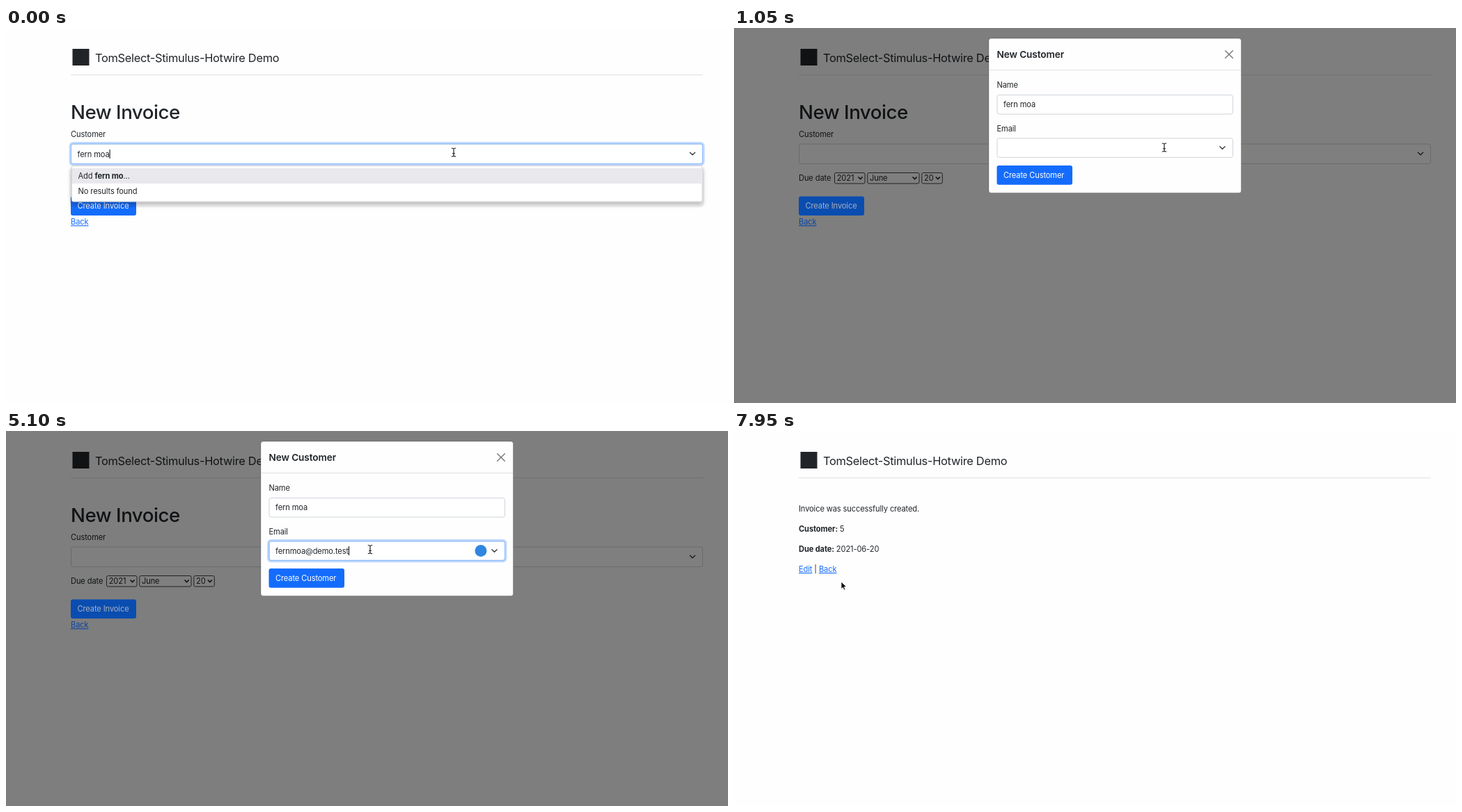
Animation, 1037 px wide and 540 px high, one loop 8 s. Source, as an HTML page:

```html
<!DOCTYPE html>
<html lang="en">
<head>
<meta charset="utf-8">
<title>New Invoice</title>
<style>
html, body { margin: 0; width: 100%; height: 100%; overflow: hidden; background: #fefefe; }
svg { display: block; width: 100vw; height: 100vh; }
text {
  font: 11.1px Inter, "Open Sans", sans-serif;
  font-optical-sizing: none;
  letter-spacing: -.01em;
  fill: #212529;
}
.brand { font-size: 16.4px; letter-spacing: -.018em; }
.h1 { font-size: 27.7px; font-weight: 500; letter-spacing: -.018em; }
.h5 { font-size: 13.7px; font-weight: 600; }
.b { font-weight: 700; }
.link { fill: #146cfd; text-decoration: underline; }
.white { fill: #fff; }
.mail { font-size: 9.2px; font-weight: 600; letter-spacing: 0; fill: #fff; }
.line { fill: none; stroke: #343a40; stroke-width: 1.4; stroke-linecap: round; stroke-linejoin: round; }
</style>
</head>
<body>
<svg id="stage" viewBox="0 0 1037 540" preserveAspectRatio="none"></svg>
<script>
const LOOP = 8000, STEP = 150;
const BLUE = '#146cfd';
const NAME = 'fern moa', MAIL = 'fernmoa@demo.test';

const saved = ['fenolunarasodeph@demo.test', 'sdfs', 'domanmabuz19@demo.test',
  'dolver@demo.test', 'sdf', 'tovman@demo.test'];

// [time, letters typed]
const keys = [[2700, 2], [2850, 4], [3150, 5], [3300, 6], [3450, 7], [3750, 8], [4050, 9],
  [4200, 10], [4350, 11], [4500, 12], [4800, 13], [4950, 15], [5100, 17]];

// [time, x, y, pointer]
const moves = [[0, 643, 179, 'beam'], [450, 643, 178, 'arrow'], [1050, 618, 172, 'beam'],
  [1200, 566, 157, 'arrow'], [1350, 524, 150, 'arrow'], [1500, 523, 156, 'arrow'],
  [1650, 523, 170.5, 'beam'], [5400, 523, 170.5, 'beam'], [5850, 522.5, 170, 'arrow'],
  [6000, 523, 170.5, 'beam'], [6600, 440, 186, 'beam'], [6750, 300, 226, 'arrow'],
  [6900, 200, 246, 'arrow'], [7050, 147, 257, 'hand'], [7950, 154, 217, 'arrow']];

const text = (x, y, s, cls = '', id = '') => `<text x="${x}" y="${y}" class="${cls}" id="${id}">${s}</text>`;
const rect = (x, y, w, h, more = '') => `<rect x="${x}" y="${y}" width="${w}" height="${h}" ${more}/>`;
const field = (x, y, w, h) => rect(x, y, w, h, 'rx="2.9" fill="#fff" stroke="#ced4da"');
const ring = (x, y, w, h, id) => `<g id="${id}" fill="none">` +
  rect(x - 1.5, y - 1.5, w + 3, h + 3, 'rx="4.4" stroke="#0d6efd" stroke-opacity=".25" stroke-width="3"') +
  rect(x, y, w, h, 'rx="2.9" stroke="#86b7fe"') + '</g>';
const chevron = (x, y) => `<path class="line" d="M${x - 3.6} ${y - 1.8}l3.6 3.6 3.6-3.6"/>`;
const select = (x, w, s) => rect(x, 208.5, w, 15.5, 'rx="2" fill="#fff" stroke="#444"') +
  text(x + 3.2, 220.3, s) +
  `<path class="line" d="M${x + w - 9} 214.8l2.6 2.8 2.6-2.8" style="stroke-width:1.7"/>`;

const form = text(93, 131, 'New Invoice', 'h1') + text(93, 156.5, 'Customer') +
  field(93.5, 167, 907, 28.5) + ring(93.5, 167, 907, 28.5, 'pageRing') +
  text(102.5, 185.5, '', '', 'customer') + rect(0, 175, 1, 13, 'id="pageCaret"') + chevron(986, 181) +
  text(93, 220.3, 'Due date') + select(144.5, 43.5, '2021') + select(191.8, 74.2, 'June') +
  select(269.8, 29.5, '20');

const receipt = text(93, 116, 'Invoice was successfully created.') +
  text(93, 145, '<tspan class="b">Customer:</tspan> 5') +
  text(93, 174, '<tspan class="b">Due date:</tspan> 2021-06-20') +
  text(93, 203, '<tspan class="link">Edit</tspan> | <tspan class="link">Back</tspan>');

const options = rect(91, 200, 912, 58, 'rx="6" fill-opacity=".05"') +
  rect(94.5, 198.5, 905.5, 51.5, 'rx="2.5" fill="#fff" stroke="#d4d4d4" filter="url(#shade)"') +
  rect(95, 202, 904.5, 22, 'fill="#e9e9ed"') +
  text(103.5, 217.4, 'Add <tspan class="b" id="query"></tspan>...') + text(103.5, 239.4, 'No results found');

const popup = rect(378, 188, 165.5, 167.5, 'rx="3" fill="#2a2a2e" stroke="#555" stroke-width=".5" filter="url(#shade)"') +
  saved.map((s, i) => text(386.5, 209.6 + i * 26.2, s, 'mail')).join('');

const modal = rect(366, 15, 362.5, 222.5, 'rx="3.5" fill="#fefefe" stroke="#000" stroke-opacity=".2"') +
  text(377.5, 42.8, 'New Customer', 'h5') +
  '<path d="M705.7 32.7l10.6 10.6m0-10.6l-10.6 10.6" stroke="#7a7a7a" stroke-width="1.5" stroke-linecap="round"/>' +
  rect(366.5, 60, 361.5, 1, 'fill="#dee2e6"') +
  text(377.5, 86, 'Name') + field(378, 96.5, 338.5, 27.5) + text(387, 114.4, NAME) +
  text(377.5, 148.5, 'Email') + field(378, 158.8, 338.5, 27.5) + ring(378, 158.8, 338.5, 27.5, 'mailRing') +
  text(387, 176.7, '', '', 'mail') + rect(0, 166, 1, 13, 'id="mailCaret"') +
  `<circle id="badge" cx="682" cy="172.5" r="8.5" fill="#2f86e0"/>` + chevron(701.5, 172.5) +
  '<g id="submit">' + ring(377.5, 198, 108.5, 27.7, 'submitRing') +
  rect(377.5, 198, 108.5, 27.7, `rx="2.9" fill="${BLUE}"`) + text(387, 216.2, 'Create Customer', 'white') + '</g>' +
  `<g id="popup">${popup}</g>`;

const pointers = `
<g id="beam" fill="none" stroke-linecap="round">
  ${['#fff" stroke-width="2.4', '#111" stroke-width="1.1'].map(s =>
    `<path stroke="${s}" d="M-2.8-6q2.4 0 2.8 1.2q.4-1.2 2.8-1.2M0-4.8V4.8M-2.8 6q2.4 0 2.8-1.2q.4 1.2 2.8 1.2M-1.5 1.8h3"/>`).join('')}
</g>
<path id="arrow" d="M0 0V10.4l2.4-2.1 1.7 3.7 1.7-.8-1.6-3.6h3.3z" fill="#000" stroke="#fff" stroke-width=".8"/>
<path id="hand" d="M-2 0q1-1.2 2 0v4.2q1.2-.9 2 .2q1.1-.7 1.9.3q1.5-.4 1.7 1V8.500q-.2 1.800-1.200 3.300H-2.300Q-3-.500-5 6.300q.600-1.600 3 .200z" fill="#fff" stroke="#111" stroke-width=".9" stroke-linejoin="round"/>`;

stage.innerHTML = `
<filter id="shade" x="-10%" y="-20%" width="120%" height="150%">
  <feDropShadow dx="0" dy="3.500" stdDeviation="3" flood-opacity=".25"/>
</filter>
${rect(0, 0, 1037, 540, 'fill="#fefefe"')}
${rect(95.5, 30, 24, 24, 'fill="#212529"')}
${text(128, 48.6, 'TomSelect-Stimulus-Hotwire Demo', 'brand')}
${rect(93, 67, 908, 1, 'fill="#dee2e6"')}
<g id="form">${form}</g>
<g id="receipt">${receipt}</g>
${rect(0, 0, 1037, 540, 'id="backdrop"')}
<g id="actions">
  ${rect(93, 242.5, 94, 27.5, 'rx="2.9" id="create"')}
  ${text(102.5, 260.4, 'Create Invoice', '', 'createText')}
  ${text(93, 283.2, 'Back', 'link', 'back')}
</g>
<g id="options">${options}</g>
<g id="modal">${modal}</g>
<g id="pointer">${pointers}</g>`;

const $ = id => document.getElementById(id);
const show = (id, on) => { $(id).style.display = on ? '' : 'none'; };
const ramp = (t, start, length) => Math.min(1, Math.max(0, (t - start) / length));
const latest = (list, t) => list.filter(k => k[0] <= t).pop();
const blend = (a, b, k) => `color-mix(in srgb, ${b} ${k * 100}%, ${a})`;

// cubic-bezier(0, 0, .58, 1)
function easeOut(x) {
  let lo = 0, hi = 1;
  for (let i = 0; i < 20; i++) {
    const s = (lo + hi) / 2;
    if (1.74 * (1 - s) * s * s + s ** 3 < x) lo = s; else hi = s;
  }
  return 3 * (1 - lo) * lo * lo + lo ** 3;
}

function type(id, caret, s, x, caretOn) {
  $(id).textContent = s;
  show(caret, caretOn);
  if (caretOn) $(caret).setAttribute('x', x + $(id).getComputedTextLength());
}

function drawPage(t) {
  const done = t >= 7350;
  show('form', !done);
  show('actions', !done);
  show('receipt', done);
  show('options', t < 450);
  show('pageRing', t < 900);
  const name = t < 450 ? NAME : t < 5850 ? '' : NAME[0].toUpperCase() + NAME.slice(1);
  type('customer', 'pageCaret', name, 102.5, t < 450);
  $('query').textContent = t < 150 ? NAME.slice(0, -1) : NAME;

  const dim = ramp(t, 385, 150) - ramp(t, 5868, 150);
  const face = t >= 7200 ? '#0a58ca' : t >= 7050 ? '#0b5ed7' : BLUE;
  $('backdrop').style.opacity = dim / 2;
  $('create').style.fill = blend(face, '#0a4db0', dim);
  $('createText').style.fill = blend('#fff', '#a8b0bc', dim);
  $('back').style.fill = blend(BLUE, '#0845a8', dim);
}

function drawModal(t) {
  const alpha = ramp(t, 535, 150) - ramp(t, 5750, 150);
  const lift = 1 - easeOut(ramp(t, 535, 300)) + easeOut(ramp(t, 5750, 300));
  const focused = t >= 1950 && t < 5250;
  show('modal', alpha > 0);
  $('modal').style.opacity = alpha;
  $('modal').setAttribute('transform', `translate(0 ${-36.2 * lift})`);
  show('mailRing', focused);
  show('badge', focused);
  show('popup', t >= 1950 && t < 2700);
  show('submitRing', t >= 5250 && t < 5400);
  $('submit').style.opacity = t < 5400 ? 1 : .65;
  const typed = MAIL.slice(0, (latest(keys, t) || [0, 0])[1]);
  type('mail', 'mailCaret', typed, 387, focused && (t < 2400 || t >= 2700));
}

function drawPointer(t) {
  const [, x, y, kind] = latest(moves, t);
  for (const k of ['beam', 'arrow', 'hand']) show(k, k === kind);
  $('pointer').setAttribute('transform', `translate(${x} ${y})`);
}

function draw() {
  // the screen refreshes in fixed steps
  const t = Math.floor(performance.now() % LOOP / STEP) * STEP;
  drawPage(t);
  drawModal(t);
  drawPointer(t);
  requestAnimationFrame(draw);
}
draw();
</script>
</body>
</html>
```
